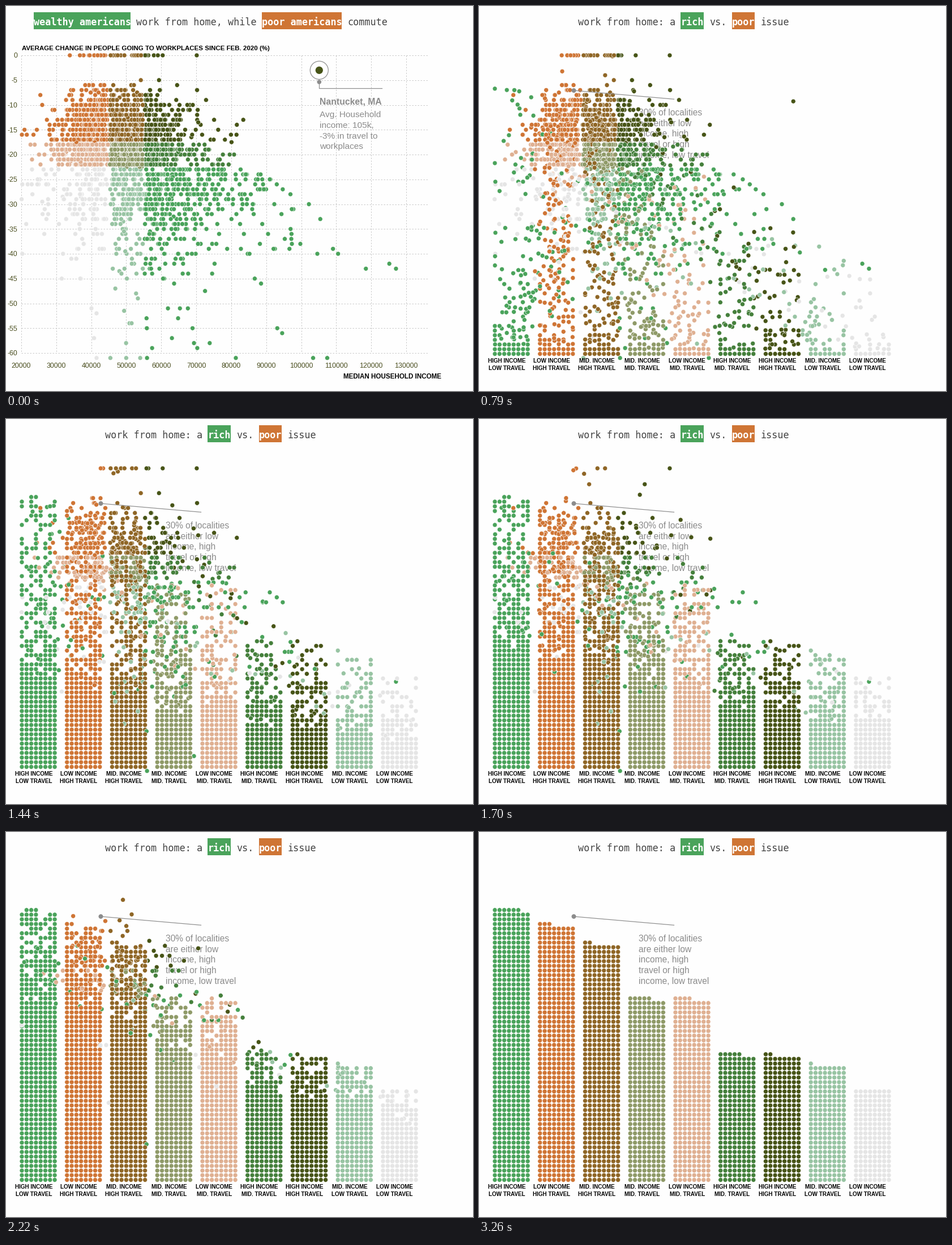
These frames come from a looping animation (825x679 px, 3390 ms). A matplotlib script:

```python
import numpy as np
import matplotlib.pyplot as plt
from matplotlib.animation import FuncAnimation

W, H, DPI = 825, 679, 100
PX = 72 / DPI
INTERVAL, LOOP = 30, 3390
HOLD, STEP = 530, 130       # first scene, then one pose per STEP
TRAVEL = 3.0                # steps a dot needs to reach its column
ADVANCE = 10.08             # width of one header character

GREEN, ORANGE, DARK = "#4aa35b", "#cf7535", "#475417"
GREY, TICK = "#8c8c8c", "#4b4f20"
SANS, MONO = "Liberation Sans", "DejaVu Sans Mono"

rng = np.random.default_rng(11)

fig = plt.figure(figsize=(W / DPI, H / DPI), dpi=DPI, facecolor="#fefefe")
ax = fig.add_axes([0, 0, 1, 1])
ax.set(xlim=(0, W), ylim=(H, 0))
ax.axis("off")


def label(x, y, text, size, color="black", font=SANS, **kw):
    return ax.text(x, y, text, fontsize=size * PX, color=color,
                   family=font, va="baseline", **kw)


def paragraph(x, y, text, size):
    return [label(x, y + 18.8 * i, row, size, GREY, zorder=2)
            for i, row in enumerate(text.split("\n"))]


def line(xs, ys, color=GREY, width=1.0, **kw):
    return ax.plot(xs, ys, color=color, lw=width * PX, **kw)[0]


def disc(x, y, r, z, face=GREY, edge="none"):
    c = plt.Circle((x, y), r, fc=face, ec=edge, lw=1.2 * PX, zorder=z)
    return ax.add_patch(c)


def header(x, parts):
    """Monospaced heading; parts with a colour get a filled box."""
    out = []
    for text, box in parts:
        if box:
            out.append(ax.add_patch(plt.Rectangle(
                (x, 11), ADVANCE * len(text), 30, fc=box, lw=0)))
        out.append(label(x, 34, text, 16.75, "white" if box else "#444444",
                         MONO, weight="bold" if box else "normal", zorder=5))
        x += ADVANCE * (len(text) + 1)
    return out


# ---------------------------------------------------------------- dots

# income, travel, colour, dot count; one column each, left to right
GROUPS = [
    ("HIGH", "LOW", GREEN, 470),
    ("LOW", "HIGH", ORANGE, 443),
    ("MID.", "HIGH", "#8f6626", 410),
    ("MID.", "MID.", "#8f9a68", 317),
    ("LOW", "MID.", "#dfb092", 316),
    ("HIGH", "MID.", "#45803c", 221),
    ("HIGH", "HIGH", DARK, 218),
    ("MID.", "LOW", "#98c4a3", 201),
    ("LOW", "LOW", "#e5e5e5", 160),
]
HERO = (553.3, 113.3)       # the annotated dot


def drops(travel, n):
    """Drop in travel (%), mostly whole numbers."""
    if travel == "HIGH":
        v = np.floor(5 + 13 * rng.random(n) ** 0.45)
        return v * (rng.random(n) > 0.05)
    if travel == "MID.":
        return rng.integers(18, 23, n).astype(float)
    return 23 + np.floor(rng.gamma(1.3, 6, n))


def scatter_home(income, travel, n):
    v = drops(travel, n)
    if income == "LOW":
        x = 181 - rng.gamma(2, 12 + 0.5 * np.minimum(v, 24))
        x = 27 + np.abs(x - 27)
    elif income == "MID.":
        x = rng.uniform(183, 242, n)
    else:
        wide = 90 if travel == "LOW" else 22 + 0.9 * v
        x = 245 + rng.exponential(wide, n)
        if travel == "LOW":     # the richest stay home the most
            v += np.floor(np.maximum(0, x - 430) / 14)
    v += 0.5 * ((rng.random(n) < 0.02) & (v > 0))
    return np.column_stack([np.minimum(x, 746), 87 + 8.75 * np.minimum(v, 61)])


homes, goals, starts, colors = [], [], [], []
for col, (income, travel, color, n) in enumerate(GROUPS):
    slot = rng.permutation(n)
    home = scatter_home(income, travel, n)
    start = -0.3 + 18.8 * slot / n * rng.random(n)
    if color == DARK:
        home[0], start[0] = HERO, 1.95
    homes.append(home)
    goals.append(np.column_stack([28 + 79.75 * col + 8.3 * (slot % 8),
                                  613.5 - 8.205 * (slot // 8)]))
    starts.append(start)
    colors += [color] * n

order = rng.permutation(len(colors))
homes = np.vstack(homes)[order]
goals = np.vstack(goals)[order]
starts = np.concatenate(starts)[order]
colors = np.array(colors)[order]

dots = ax.scatter(homes[:, 0], homes[:, 1], s=(8.0 * PX) ** 2, c=colors,
                  edgecolors="white", linewidths=0.6 * PX, zorder=3)

# ------------------------------------------------------- scatter scene

chart = header(49, [("wealthy americans", GREEN),
                    ("work from home, while", None),
                    ("poor americans", ORANGE), ("commute", None)])
grid = dict(color="#c9c9c9", linestyle=(0, (2.5, 2.5)), zorder=0)
for i in range(13):
    y = 87 + 43.75 * i
    chart += [line([27, 746], [y, y], **grid),
              label(20, y + 4.4, str(-5 * i), 12.4, TICK, ha="right")]
for i in range(12):
    x = 27 + 61.82 * i
    chart += [line([x, x], [87, 612], **grid),
              label(x, 637.5, str(20000 + 10000 * i), 12.4, TICK,
                    ha="center")]
x, y = HERO
chart += [
    label(28, 78.5, "AVERAGE CHANGE IN PEOPLE GOING TO WORKPLACES "
          "SINCE FEB. 2020 (%)", 11.5, weight="bold"),
    label(769, 657, "MEDIAN HOUSEHOLD INCOME", 11.65, weight="bold",
          ha="right"),
    disc(x, y, 16, 4, "white", GREY),
    disc(x, y, 6.6, 5, DARK),
    line([x, x, 664], [134, 144.5, 144.5], width=1.2, zorder=4),
    disc(x, 134, 3.8, 5),
    label(554, 173, "Nantucket, MA", 15.8, GREY, weight="bold"),
]
chart += paragraph(554, 196, "Avg. Household\nincome: 105k,\n"
                   "-3% in travel to\nworkplaces", 15.4)

# -------------------------------------------------------- column scene

bars = header(175, [("work from home: a", None), ("rich", GREEN),
                    ("vs.", None), ("poor", ORANGE), ("issue", None)])
for col, (income, travel, *_) in enumerate(GROUPS):
    x = 48.8 + 79.72 * col
    for y, text in [(629.3, income + " INCOME"), (641.8, travel + " TRAVEL")]:
        bars.append(label(x, y, text, 9.9, weight="bold", ha="center"))
bars += paragraph(282, 192.7, "30% of localities\nare either low\n"
                  "income, high\ntravel or high\nincome, low travel", 15.5)
bars += [line([167.5, 344.5], [149, 164.3], width=1.2, zorder=4),
         disc(167.5, 149, 4, 5)]


def ease(u):
    u = np.clip(u, 0, 1)
    return np.where(u < 0.5, 4 * u ** 3, 1 - 4 * (1 - u) ** 3)


def update(frame):
    t = frame * INTERVAL + INTERVAL - 1
    step = (t - HOLD) // STEP + 1 if t >= HOLD else 0
    for a in chart:
        a.set_visible(step == 0)
    for a in bars:
        a.set_visible(step > 0)
    u = ease((step - starts) / TRAVEL) if step else np.zeros(len(starts))
    dots.set_offsets(homes + (goals - homes) * u[:, None])
    return [dots]


anim = FuncAnimation(fig, update, frames=LOOP // INTERVAL, interval=INTERVAL,
                     repeat=True, repeat_delay=0, blit=False)
plt.show()
```
